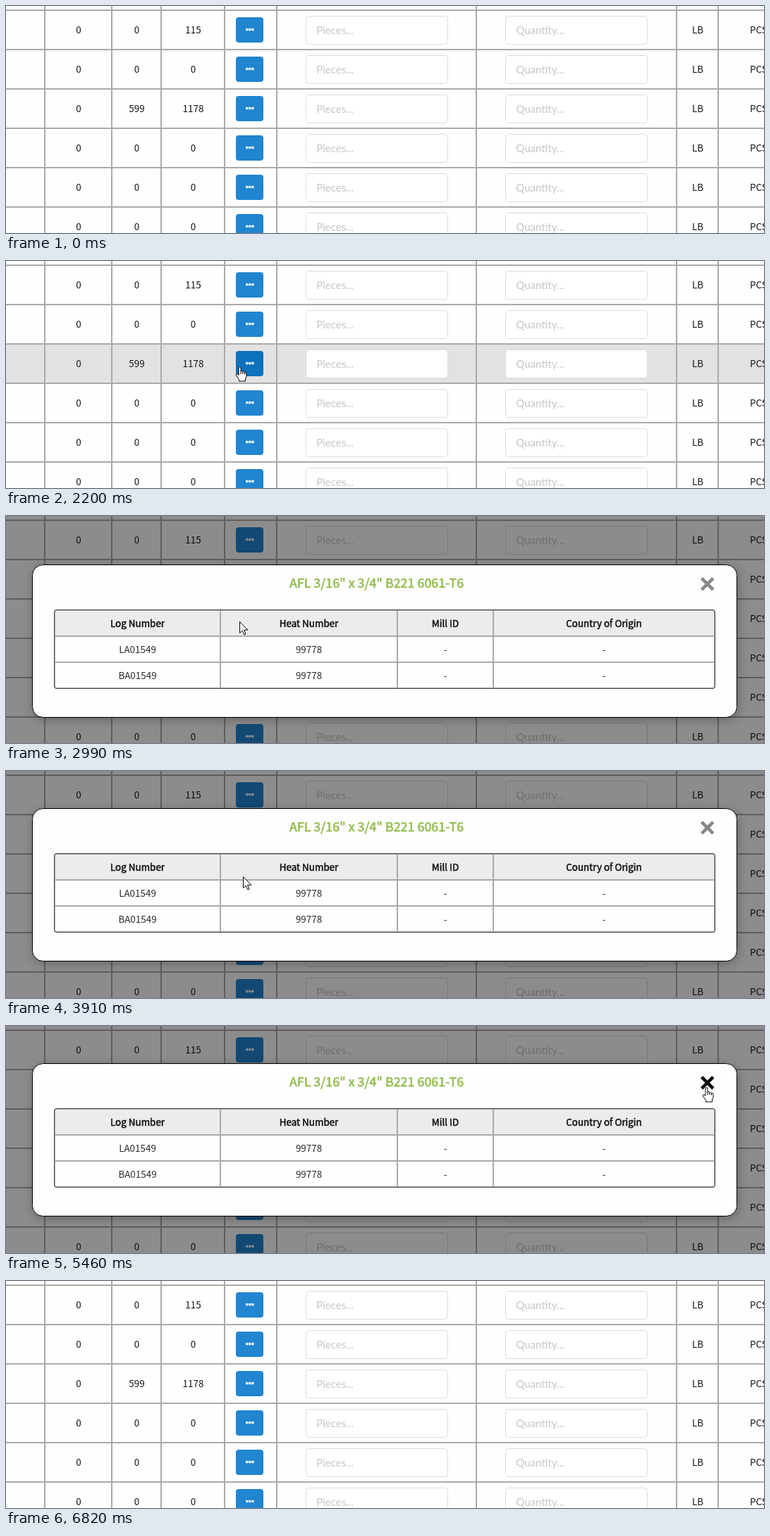
An HTML page with a canvas for the animation above (7380 ms loop, 1075 by 323 pixels).

```html
<!DOCTYPE html>
<html lang="en">
<head>
<meta charset="utf-8">
<title>Heat lookup</title>
<style>
html, body { margin: 0; width: 100%; height: 100%; overflow: hidden; background: #fefefe; }
canvas { display: block; width: 1075px; height: 323px; }
</style>
</head>
<body>
<canvas id="stage" width="1075" height="323"></canvas>
<script>
const W = 1075, H = 323, LOOP = 7380;
const ctx = document.getElementById('stage').getContext('2d');

const SANS = '"Noto Sans CJK JP", "Noto Sans CJK SC", "Noto Sans CJK", "Source Sans Pro", sans-serif';
const BODY = '13.43px ' + SANS;
const TITLE = '17.9px ' + SANS;
const HINT = '15px Lato, sans-serif';

const GRID = '#aaaaaa', HOVER = '#e2e2e2', PAPER = '#fefefe';
const PITCH = 56;
const COLS = [55, 150, 220, 310, 384, 667, 951, 1010];
const ROWS = [[0, 0, 115], [0, 0, 0], [0, 599, 1178], [0, 0, 0], [0, 0, 0], [0, 0, 0]];

// Pointer strokes: [time, x, y]
const STROKES = [
  [[880, 262, 328], [1060, 292, 236], [1240, 315, 173], [1420, 326, 154], [1610, 331, 150]],
  [[3870, 331, 150], [4150, 470, 158], [4600, 800, 166], [5000, 960, 130], [5340, 993, 87]],
  [[6150, 993, 87], [6450, 976, 180], [6820, 940, 330]]
];
const ENTER = 900, HAND = 1670, PRESS = 2200, DIM = 2650, OPEN = 2780, OPENED = 3130;
const ON_CLOSE = 5340, BLACK = 5460, CLOSED = 5910, LEAVE = 6820;

const clamp = v => Math.max(0, Math.min(1, v));

function rect(x, y, w, h, color) {
  ctx.fillStyle = color;
  ctx.fillRect(x, y, w, h);
}

function roundRect(x, y, w, h, r, fill, stroke) {
  ctx.beginPath();
  ctx.roundRect(x, y, w, h, r);
  if (fill) { ctx.fillStyle = fill; ctx.fill(); }
  if (stroke) { ctx.strokeStyle = stroke; ctx.lineWidth = 1; ctx.stroke(); }
}

function text(str, x, y, font, color, align = 'center', bold = 0) {
  ctx.font = font;
  ctx.textAlign = align;
  ctx.fillStyle = color;
  ctx.fillText(str, x, y);
  if (bold) {
    ctx.strokeStyle = color;
    ctx.lineWidth = bold;
    ctx.lineJoin = 'round';
    ctx.strokeText(str, x, y);
  }
}

// Cubic Hermite through the points of a stroke, at rest at both ends
function along(pts, t) {
  const last = pts.length - 1;
  if (t >= pts[last][0]) return pts[last].slice(1);
  let i = 0;
  while (t > pts[i + 1][0]) i++;
  const a = pts[i], b = pts[i + 1], span = b[0] - a[0], u = clamp((t - a[0]) / span);
  const slope = (n, k) => n === 0 || n === last ? 0
    : (pts[n + 1][k] - pts[n - 1][k]) / (pts[n + 1][0] - pts[n - 1][0]);
  return [1, 2].map(k => {
    const u2 = u * u, u3 = u2 * u;
    return (2 * u3 - 3 * u2 + 1) * a[k] + (u3 - 2 * u2 + u) * span * slope(i, k)
      + (3 * u2 - 2 * u3) * b[k] + (u3 - u2) * span * slope(i + 1, k);
  });
}

function pointer(t) {
  if (t < ENTER || t >= LEAVE) return null;
  const stroke = STROKES.filter(s => t >= s[0][0]).pop();
  return along(stroke, t).map(Math.round);
}

function button(y, color) {
  roundRect(326, y, 39, 36, 4, color);
  for (let i = 0; i < 3; i++) roundRect(340 + i * 4.1, y + 15.8, 3.4, 3.4, 0.7, '#eef5fb');
}

function input(x, y, hint) {
  roundRect(x + 0.5, y + 0.5, 201, 40, 4, '#ffffff', '#dcdcdd');
  text(hint, x + 15.3, y + 26, HINT, '#c6c6c6', 'left');
}

function drawPage(t, pos) {
  rect(0, 0, W, H, PAPER);
  const covered = t >= DIM && t < CLOSED;
  const hot = pos && !covered && pos[1] < H ? Math.floor((pos[1] - 3) / PITCH) : -1;
  if (hot >= 0) rect(0, 7 + hot * PITCH, W, 54, HOVER);

  for (let r = 0; r < 6; r++) rect(0, 5 + r * PITCH, W, 2, GRID);
  COLS.forEach(x => rect(x - 1, 0, 2, H, GRID));

  ROWS.forEach((row, r) => {
    const y = 6 + r * PITCH;
    [103, 185.5, 265.5].forEach((x, i) => text(row[i], x, y + 33, BODY, '#111111'));
    let blue = '#2185d0';
    if (r === 2 && t >= PRESS && t < CLOSED) blue = '#0d71bb';
    else if (r === 2 && hot === 2 && pos[0] >= 326) blue = '#1678c2';
    button(y + 10, blue);
    input(425, y + 8, 'Pieces...');
    input(708, y + 8, 'Quantity...');
    text('LB', 981, y + 33, BODY, '#111111');
    text('PCS', 1055, y + 33, BODY, '#111111', 'left');
  });
}

function drawCross(t) {
  const v = Math.round(136 - 124 * clamp((t - ON_CLOSE) / (BLACK - ON_CLOSE)));
  ctx.strokeStyle = `rgb(${v},${v},${v})`;
  ctx.lineWidth = 4.6;
  ctx.lineCap = 'butt';
  ctx.beginPath();
  ctx.moveTo(986.6, 72.6); ctx.lineTo(1002.9, 88.9);
  ctx.moveTo(1002.9, 72.6); ctx.lineTo(986.6, 88.9);
  ctx.stroke();
}

function drawTable(pos) {
  const centers = [186.5, 429.5, 623, 848];
  ctx.save();
  ctx.beginPath();
  ctx.roundRect(68, 117, 938, 113, 4);
  ctx.clip();
  rect(68, 117, 938, 113, GRID);
  rect(70, 119, 934, 35, '#ececec');
  const hot = pos && pos[1] > 155 && pos[1] < 192 && pos[0] > 69 && pos[0] < 1005;
  rect(70, 156, 934, 35, hot ? HOVER : PAPER);
  rect(70, 193, 934, 35, PAPER);
  [304, 555, 691].forEach(x => rect(x - 1, 118, 2, 111, GRID));
  ctx.restore();
  roundRect(68.5, 117.5, 937, 112, 3.5, null, '#444444');

  const line = (cells, y, color, bold) =>
    cells.forEach((c, i) => text(c, centers[i], y, BODY, color, 'center', bold));
  line(['Log Number', 'Heat Number', 'Mill ID', 'Country of Origin'], 142, '#111111', 0.5);
  line(['LA01549', '99778', '-', '-'], 179, '#2a2a2a');
  line(['BA01549', '99778', '-', '-'], 216, '#2a2a2a');
}

function drawModal(t, pos) {
  const rest = 1 - clamp((t - OPEN) / (OPENED - OPEN));
  ctx.save();
  ctx.translate(0, Math.round(250 * rest ** 3));
  ctx.save();
  ctx.shadowColor = 'rgba(0,0,0,0.3)';
  ctx.shadowBlur = 14;
  ctx.shadowOffsetX = 1;
  ctx.shadowOffsetY = 3;
  roundRect(37.5, 53.5, 999, 217, 15, PAPER);
  ctx.restore();
  roundRect(37.5, 53.5, 999, 217, 15, PAPER, '#000000');
  text('AFL 3/16" x 3/4" B221 6061-T6', 525.5, 86, TITLE, '#93bd4e', 'center', 0.65);
  drawCross(t);
  drawTable(rest ? null : pos);
  ctx.restore();
}

function drawShape(x, y, path) {
  ctx.save();
  ctx.translate(x + 0.5, y + 0.5);
  ctx.fillStyle = '#ffffff';
  ctx.strokeStyle = '#000000';
  ctx.lineWidth = 1;
  ctx.lineJoin = 'round';
  ctx.fill(path);
  ctx.stroke(path);
  ctx.restore();
}

const ARROW = new Path2D('M0 0V16L3.7 12.6L6.4 18.5L8.6 17.5L6 11.7H11.4Z');
const PALM = new Path2D('M-1.5 12V1.5Q-1.5 0 0 0Q1.5 0 1.5 1.5V6.5Q3 5 4.3 7' +
  'Q6 6 7 8Q9.5 7.5 9.5 10V14L8 17.5V20.5H-1V18L-5 12.5Q-5.8 10.2 -4 10Z' +
  'M1.5 6.5V10.5M4.3 7V10.5M7 8V11');

function drawPointer(t, [x, y]) {
  const hand = (t >= HAND && t < DIM) || (t >= ON_CLOSE && t < CLOSED);
  drawShape(x, y, hand ? PALM : ARROW);
}

function draw(t) {
  const pos = pointer(t);
  drawPage(t, pos);
  if (t >= DIM && t < CLOSED) {
    rect(0, 0, W, H, 'rgba(0,0,0,0.45)');
    if (t >= OPEN + 30) drawModal(t, pos);
  }
  if (pos) drawPointer(t, pos);
}

const start = performance.now();
function tick() {
  draw((performance.now() - start) % LOOP);
  requestAnimationFrame(tick);
}
tick();
</script>
</body>
</html>
```
